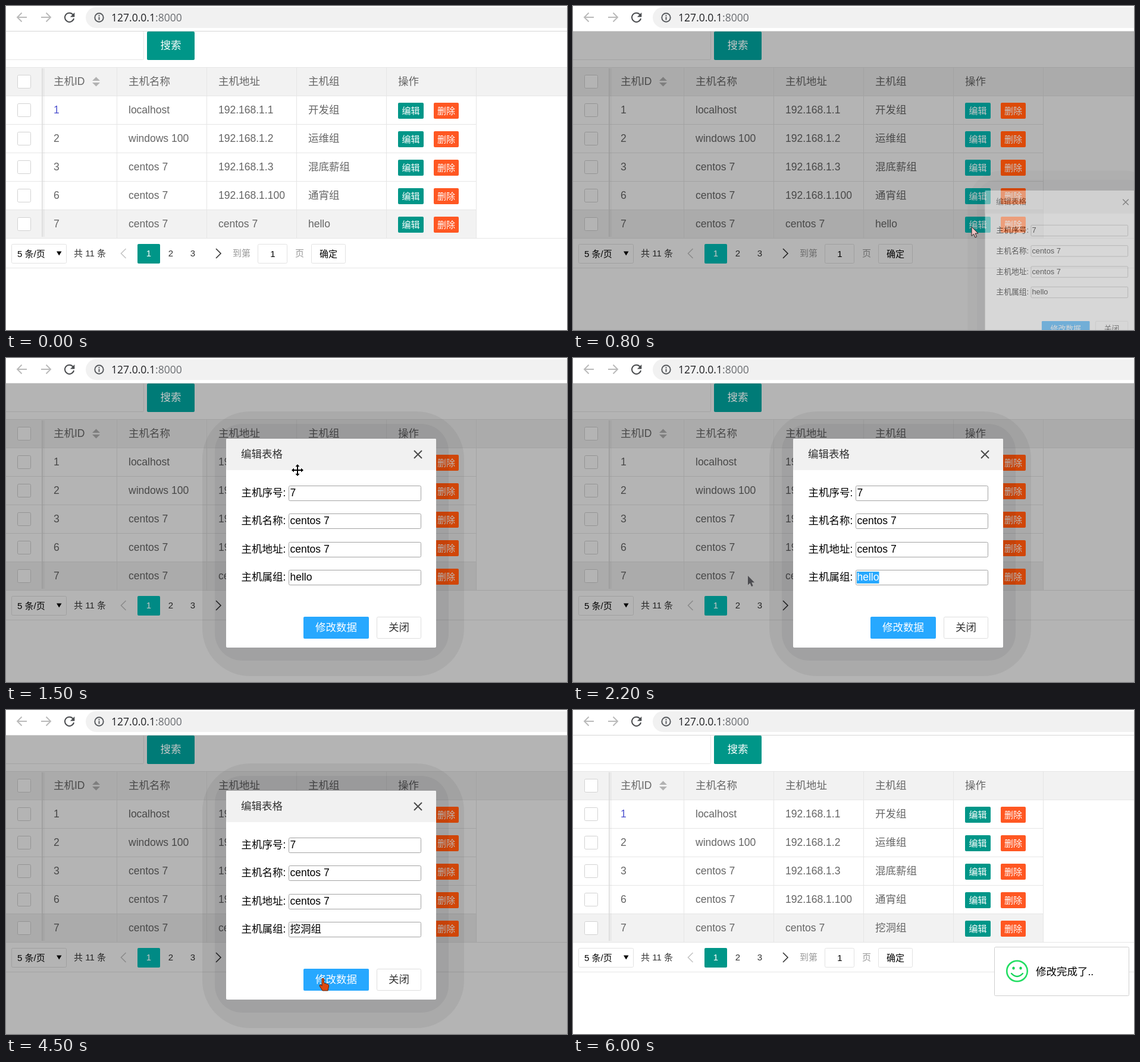
An HTML page that plays this animation: 943x546 px, repeating every 6800 ms.

```html
<!DOCTYPE html>
<html lang="zh">
<head>
<meta charset="utf-8">
<title>主机列表</title>
<style>
  html, body { margin: 0; width: 100%; height: 100%; overflow: hidden; background: #fff; }
  svg { display: block; width: 100%; height: 100%; }
  text { font: 17.5px "Liberation Sans", "Noto Sans CJK SC", "Noto Sans CJK JP", sans-serif; fill: #666; }
  .small { font-size: 15px; }
  .url { font: 17.5px "Open Sans", "Noto Sans", sans-serif; fill: #202124; }
  .mid { text-anchor: middle; }
  .black { fill: #000; }
  .ink { fill: #333; }
  .pale { fill: #999; }
  .white { fill: #fff; }
  .teal { fill: #009688; }
  .red { fill: #ff5722; }
  .first { fill: #5054cf; }
  .dark .first { fill: #666; }
  .dark .teal { fill: #008a85; }
  .dark .search { fill: #007b77; }
  .dark .red { fill: #dd4a08; }
  .dark #buttons text { fill: #c8c8c8; }
</style>
</head>
<body>
<svg id="stage" viewBox="0 0 943 546"></svg>
<script>
const LOOP = 6800, FRAME = 100;
const stage = document.getElementById('stage');
const $ = id => document.getElementById(id);
const clamp = v => Math.max(0, Math.min(1, v));

// Same curve as the CSS "ease" keyword
function ease(x) {
  const bezier = (u, a, b) => 3 * u * (1 - u) ** 2 * a + 3 * u * u * (1 - u) * b + u ** 3;
  let low = 0, high = 1;
  for (let i = 0; i < 20; i++) {
    const u = (low + high) / 2;
    if (bezier(u, .25, .25) < x) low = u; else high = u;
  }
  return x <= 0 ? 0 : x >= 1 ? 1 : bezier(low, .1, 1);
}

// Markup helpers
const rect = (x, y, w, h, attrs = '') => `<rect x="${x}" y="${y}" width="${w}" height="${h}" ${attrs}/>`;
const box = (x, y, w, h, stroke, attrs = 'fill="#fff"') =>
  rect(x + .5, y + .5, w - 1, h - 1, `rx="2" stroke="${stroke}" ${attrs}`);
const text = (x, y, s, cls = '', attrs = '') => `<text x="${x}" y="${y}" class="${cls}" ${attrs}>${s}</text>`;
const path = (d, stroke, width = 1, attrs = 'fill="none"') =>
  `<path d="${d}" stroke="${stroke}" stroke-width="${width}" ${attrs}/>`;
const hline = (y, w) => rect(0, y, w, 1, 'fill="#e6e6e6"');
const group = (id, body, attrs = '') => `<g id="${id}" ${attrs}>${body}</g>`;

const rows = [
  ['1', 'localhost', '192.168.1.1', '开发组'],
  ['2', 'windows 100', '192.168.1.2', '运维组'],
  ['3', 'centos 7', '192.168.1.3', '混底薪组'],
  ['6', 'centos 7', '192.168.1.100', '通宵组'],
  ['7', 'centos 7', 'centos 7', 'hello'],
];
const columns = [80, 206, 357, 508, 659];

function browserBar() {
  return rect(0, 0, 943, 43, 'fill="#fff"') + rect(0, 42, 943, 1, 'fill="#d6d6d6"') +
    rect(134, 2, 840, 35, 'rx="17.5" fill="#f1f1f1"') +
    path('M35 19H19.5M26.5 11.5L19 19L26.5 26.5M59 19H74.5M67.5 11.5L75 19L67.5 26.5', '#bababa', 1.9) +
    path('M112.6 14.6A7.6 7.6 0 1 0 114 21', '#4b4d50', 2) +
    '<path d="M115.3 11v7.4h-7.4z" fill="#4b4d50"/>' +
    '<circle cx="156.5" cy="19.5" r="7.2" fill="none" stroke="#55585c" stroke-width="1.9"/>' +
    path('M156.5 18.5V23.5M156.5 15.3V17.2', '#55585c', 1.9) +
    text(177, 26, '127.0.0.1<tspan fill="#6a6d71">:8000</tspan>', 'url');
}

function table() {
  let s = box(-6, 42, 238, 49, '#e6e6e6') +
    rect(0, 103, 943, 48, 'fill="#f2f2f2"') + rect(0, 344, 790, 47, 'fill="#f2f2f2"') +
    hline(103, 943) + hline(151, 943) + hline(391, 943) + hline(441, 943);
  for (let y = 199; y < 391; y += 48) s += hline(y, 791);
  for (let x = 186; x <= 790; x += 151) s += rect(x, 103, 1, 288, 'fill="#e6e6e6"');
  s += rect(60, 105, 1.5, 284, 'fill="#dcdcdc"') + rect(61.5, 105, 3.5, 284, 'fill="#000" opacity=".03"');
  ['主机ID', '主机名称', '主机地址', '主机组', '操作'].forEach((h, i) => s += text(columns[i], 133, h));
  s += '<path d="M145 126l6.5-6.5l6.5 6.5zM145 129h13l-6.5 6.5z" fill="#b2b2b2"/>';
  for (let i = 0; i < 6; i++) s += box(19, 116 + 48 * i, 23, 23, '#d2d2d2');
  rows.forEach((row, r) => row.forEach((cell, c) =>
    s += text(columns[c], 181 + 48 * r, cell, r + c ? '' : 'first', r == 4 && c == 3 ? 'id="team"' : '')));
  return s;
}

function pager() {
  return box(9, 401, 93, 33, '#e2e2e2') + text(19, 423, '5 条/页', 'small black') +
    '<path d="M85 413.5h8.5l-4.25 7z"/>' + text(114, 422, '共 11 条', 'small ink') +
    path('M201.5 409L193.5 417L201.5 425', '#c4c4c4', 1.6) +
    path('M353 409L361 417L353 425', '#333', 1.6) +
    text(277, 422, '2', 'small mid ink') + text(314, 422, '3', 'small mid ink') +
    text(381, 422, '到第', 'small pale') + box(423, 401, 50, 33, '#e2e2e2') +
    text(448.5, 423, '1', 'small mid black') + text(486, 422, '页', 'small pale') +
    box(513, 401, 58, 33, '#e2e2e2') + text(542, 423, '确定', 'small mid black');
}

function buttons() {
  let s = rect(237, 43, 80, 48, 'rx="2" class="teal search"') + text(277, 72, '搜索', 'mid white') +
    rect(221, 401, 38, 33, 'rx="2" class="teal"') + text(240, 422, '1', 'small mid white');
  for (let y = 163; y < 391; y += 48)
    s += rect(659, y, 43, 27, 'rx="2" class="teal"') + text(680.5, y + 19, '编辑', 'small mid white') +
      rect(719, y, 42, 27, 'rx="2" class="red"') + text(740, y + 19, '删除', 'small mid white');
  return s;
}

function dialog() {
  let s = rect(-40, -46, 440, 446, 'rx="80" fill="#000" opacity=".055"') +
    rect(-19, -25, 393, 399, 'rx="46" fill="#000020" opacity=".05"') +
    rect(0, 0, 353, 352, 'rx="2" fill="#fff"') + rect(0, 0, 353, 53, 'rx="2" fill="#f1f1f1"') +
    text(25, 32, '编辑表格', 'ink') + path('M316 20l13 13M329 20l-13 13', '#4a4a4a', 2);
  ['序号', '名称', '地址', '属组'].forEach((name, i) => {
    const y = Math.floor(79 + 47.5 * i);
    s += text(25.5, y + 18, `主机${name}:`, 'black') + box(105, y, 223, 26, '#a3a3a3');
    if (i < 3) s += text(107.5, y + 18, i ? 'centos 7' : '7', 'black');
  });
  return s + group('field', '') +
    rect(130, 300, 110, 37, 'rx="2" fill="#27a8ff"') + text(185, 324, '修改数据', 'mid white') +
    box(253, 300, 75, 37, '#dedede') + text(290.5, 324, '关闭', 'mid ink');
}

function toast() {
  return box(708, 399, 227, 83, '#cfcfcf') +
    '<circle cx="746.5" cy="440" r="17.3" fill="none" stroke="#22de62" stroke-width="2.6"/>' +
    '<g fill="#12d457"><ellipse cx="740.5" cy="435" rx="2.2" ry="2.6"/><ellipse cx="752.5" cy="435" rx="2.2" ry="2.6"/></g>' +
    path('M737 444Q746.5 454 756 444', '#12d457', 2.4, 'fill="none" stroke-linecap="round"') +
    text(778, 447, '修改完成了..', 'black');
}

const cursors = {
  arrow: '<path id="arrow" d="M0 0V15.5L3.6 12.2L6 18L8.6 16.9L6.2 11.2H11z"/>',
  move: path('M0-10L3.5-6H1V-1H6V-3.5L10 0L6 3.5V1H1V6H3.5L0 10L-3.5 6H-1V1H-6V3.5L-10 0L-6-3.5V-1H-1V-6H-3.5z',
    '#fff', 1.6, 'fill="#000" paint-order="stroke"'),
  beam: path('M-3-8Q0-8 0-6Q0-8 3-8M0-6V6M-3 8Q0 8 0 6Q0 8 3 8', '#222', 1.2),
  hand: path('M-2 0Q0-2 1.5 0V7L8 9Q10 10 9.5 13L8 20H-1L-6 12Q-6 9-3.5 10L-2 12z', '#5a2410', 1, 'fill="#dc4a10"'),
};

stage.innerHTML = rect(0, 0, 943, 546, 'fill="#fff"') + table() + pager() +
  rect(0, 43, 943, 503, 'id="shade" opacity=".295"') + group('buttons', buttons()) +
  browserBar() + group('dialog', dialog()) + group('toast', toast()) + group('ime', '') +
  group('pointer', Object.keys(cursors).map(k => group('c-' + k, cursors[k])).join(''));

// Routes: time, x, y and, for the pointer, the cursor kind
const pointerRoute = [
  [200, 860, 460, 'arrow'], [600, 670, 372, 'arrow'], [800, 670, 372, 'arrow'],
  [1100, 756, 306, 'move'], [1200, 756, 306, 'move'], [1300, 716, 298, 'move'],
  [1500, 490, 189, 'move'], [1600, 515, 250, 'arrow'], [1700, 541, 350, 'beam'],
  [1800, 517, 370, 'beam'], [1900, 500, 370, 'beam'], [2000, 468, 370, 'arrow'],
  [2200, 294, 367, 'arrow'], [4100, 294, 367, 'arrow'], [4300, 430, 428, 'arrow'],
  [4500, 533, 453, 'hand'], [5000, 533, 453, 'arrow'], [5400, 533, 453, 'arrow'],
  [5600, 557, 445, 'arrow'], [5900, 900, 461, 'arrow'],
];
const dialogRoute = [[1200, 645.5, 264], [1300, 606, 256], [1500, 370, 136]];

function follow(route, t) {
  const next = route.findIndex(p => p[0] > t);
  const b = route[next < 0 ? route.length - 1 : next];
  const a = next < 0 ? b : route[Math.max(0, next - 1)];
  const k = a === b ? 0 : (t - a[0]) / (b[0] - a[0]);
  return { x: a[1] + (b[1] - a[1]) * k, y: a[2] + (b[2] - a[2]) * k, kind: a[3] };
}

// Typing steps: time, composed letters, candidates
const typing = [
  [3000, 'w', '我 为 无 玩 完 问 万'],
  [3100, 'wa', '哇 挖 娃 瓦 蛙 袜 洼'],
  [3300, "wa'd", '挖的 挖到 洼地 瓦达 挖洞'],
  [3400, "wa'do", '挖到 挖洞 挖斗 瓦豆 挖都'],
  [3500, "wa'dong", '挖洞 挖动 瓦洞 娃懂 蛙洞'],
  [3600, "wa'dong'z", '挖洞者 挖洞中 挖洞子 挖洞组'],
  [3700, "wa'dong'zu", '挖洞组 挖动组 瓦洞组 挖洞族'],
];

function imeBar(words) {
  let x = 473, s = rect(473.5, 383.5, 480, 54, 'fill="#fff" stroke="#5f7f76"');
  words.split(' ').forEach((word, i) => {
    const w = word.length * 22 + 54.2;
    if (!i) s += rect(x, 384, Math.ceil(w), 53, 'fill="#08b87a"');
    s += text(x + 21, 420, i + 1, 'small', `style="fill:${i ? '#888' : '#d5f5e8'}"`) +
      text(x + 34.5, 421, word, i ? 'black' : 'white', 'style="font-size:22px"');
    x += w;
  });
  return s;
}

function drawField(t, step) {
  let value = 'hello', extra = '', picked = 0;
  if (t >= 3900) value = '挖洞组';
  else if (step) value = step[1];
  else picked = t >= 2000 ? 5 : t >= 1900 ? 2 : 0;
  const cut = value.length - picked;
  if (picked) extra = rect(107 + 37 * cut / 5, 224, 37 * picked / 5 + .5, 20, 'fill="#27a8ff"');
  $('field').innerHTML = extra + text(107.5, 239, value.slice(0, cut) +
    `<tspan fill="#fff">${value.slice(cut)}</tspan>`, 'black');
  if (t < 3000 || t >= 4200) return;
  const end = 107.5 + $('field').querySelector('text').getComputedTextLength();
  $('field').innerHTML += rect(end - .5, 225, 1, 19) +
    (step ? path(`M107.5 243.5H${end}`, '#000', 1, 'stroke-dasharray="9 3"') : '');
}

const show = (id, on) => $(id).style.display = on ? '' : 'none';

function zoom(id, cx, cy, scale, opacity, dx = 0, dy = 0) {
  $(id).setAttribute('transform', `translate(${cx + dx} ${cy + dy}) scale(${scale}) translate(${-cx} ${-cy})`);
  $(id).setAttribute('opacity', opacity);
}

function draw(time) {
  const t = Math.floor(time % LOOP / FRAME) * FRAME;
  const enter = ease((t - 717) / 300), leave = ease((t - 4970) / 200), pop = ease((t - 5170) / 300);
  const dark = enter > 0 && leave == 0;
  stage.classList.toggle('dark', dark);
  show('shade', dark);
  $('team').textContent = t >= 5200 ? '挖洞组' : 'hello';

  const p = follow(pointerRoute, t);
  show('pointer', t >= 200 && t < 6000);
  $('pointer').setAttribute('transform', `translate(${p.x} ${p.y})`);
  for (const k in cursors) show('c-' + k, k == p.kind);
  const early = t < 1100;
  $('arrow').setAttribute('fill', early ? '#efc3c3' : '#4c4c50');
  $('arrow').setAttribute('stroke', early ? '#222' : 'none');

  // The dialog grows in, is dragged to its place, then shrinks away
  const place = follow(dialogRoute, Math.max(1200, t));
  show('dialog', enter > 0 && leave < 1);
  zoom('dialog', 176.5, 176, .5 + .5 * enter - .3 * leave, enter * (1 - leave), place.x, place.y);

  const step = t < 3900 ? typing.filter(s => s[0] <= t).pop() : null;
  drawField(t, step);
  $('ime').innerHTML = step ? imeBar(step[2]) : '';

  show('toast', pop > 0);
  zoom('toast', 821.5, 440.5, .5 + .5 * pop, pop);
}

const start = performance.now();
let last = -1;
function tick() {
  const time = performance.now() - start, frame = Math.floor(time / FRAME);
  if (frame != last) draw(time);
  last = frame;
  requestAnimationFrame(tick);
}
tick();
</script>
</body>
</html>
```
